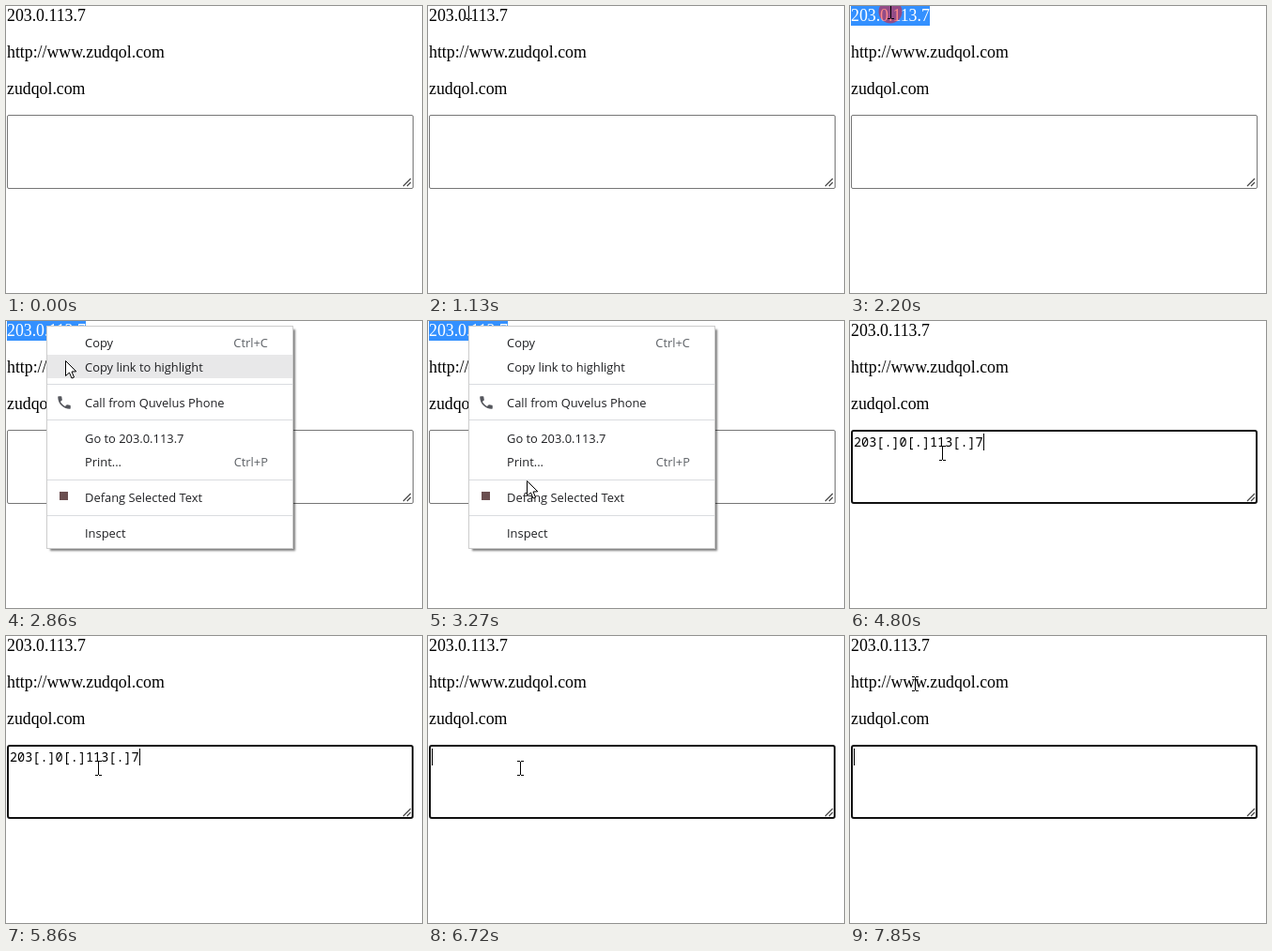
An HTML page with a canvas for the animation above (8000 ms loop, 443 px wide and 306 px high).

```html
<!DOCTYPE html>
<html lang="en">
<head>
<meta charset="utf-8">
<title>Defang from the context menu</title>
<style>
html, body { margin: 0; width: 100%; height: 100%; overflow: hidden; background: #fff; }
#stage { position: relative; width: 443px; height: 306px; overflow: hidden; background: #fff; }
#stage * { position: absolute; box-sizing: border-box; white-space: pre; }
.line { left: 1px; height: 21px; font: 17.8px/20px "Liberation Serif", "Times New Roman", serif; color: #000; }
.picked { background: #3390ff; color: #fff !important; }
#box { left: 1px; top: 116px; width: 433px; height: 79px; border: 1px solid #767676; border-radius: 2px; }
#box.focus { border: 2px solid #101010; border-radius: 3px; }
#grip { left: 422px; top: 183px; }
#typed { left: 4px; top: 120px; height: 18px; font: 13.5px/18px "Noto Sans Mono", "Liberation Mono", monospace; color: #000; }
#caret { top: 120px; width: 1px; height: 18px; background: #000; }
#menu { left: 43px; top: 5px; width: 263px; height: 238px; background: #fff; border: 1px solid #ccc;
  box-shadow: 3px 3px 2px -1px rgba(0, 0, 0, .5); font: 12.9px/27px "Open Sans", "Noto Sans", sans-serif; color: #202124; }
.row { left: 0; width: 261px; height: 25px; }
.row.hover { background: #e8e8e9; }
.row span { left: 40px; }
.row .key { left: auto; right: 26px; color: #5f6368; }
.rule { left: 0; width: 261px; height: 1px; background: #dadce0; }
#phone { left: 9px; top: 72px; }
#badge { left: 13px; top: 176px; width: 9px; height: 9px; background: #6b4f50; }
#top { left: 0; top: 0; }
</style>
</head>
<body>
<div id="stage">
  <div class="line" id="ip" style="top:0">203.0.113.7</div>
  <div class="line" style="top:39px">http://www.zudqol.com</div>
  <div class="line" style="top:78px">zudqol.com</div>
  <div id="box"></div>
  <svg id="grip" width="10" height="10" stroke="#444" stroke-width="1.2"><path d="M1 9L9 1M5 9L9 5"/></svg>
  <div id="typed"></div>
  <div id="caret"></div>
  <div id="menu"></div>
  <canvas id="top" width="443" height="306"></canvas>
</div>
<script>
const LOOP = 8000, STEP = 1000 / 15;
const $ = id => document.getElementById(id);
const ctx = $('top').getContext('2d');

// [top, label, shortcut]
const items = [
  [10, 'Copy', 'Ctrl+C'],
  [36, 'Copy link to highlight'],
  [74, 'Call from Quvelus Phone'],
  [112, 'Go to 203.0.113.7'],
  [137, 'Print...', 'Ctrl+P'],
  [175, 'Defang Selected Text'],
  [213, 'Inspect']
];

function add(cls, top) {
  const el = document.createElement('div');
  el.className = cls;
  el.style.top = top - 6 + 'px';
  $('menu').append(el);
  return el;
}

const rows = items.map(([top, label, key]) => {
  const el = add('row', top);
  el.innerHTML = `<span>${label}</span>` + (key ? `<span class="key">${key}</span>` : '');
  return { el, top };
});
[67, 105, 169, 207].forEach(y => add('rule', y));
$('menu').insertAdjacentHTML('beforeend',
  `<svg id="phone" width="18" height="18" viewBox="0 0 24 24" fill="#54565c"><path d="M6.6 10.8c1.4 2.8 3.8 5.1 6.6 6.6l2.2-2.2c.3-.3.7-.4 1-.2 1.1.4 2.3.6 3.6.6.6 0 1 .4 1 1V20c0 .6-.4 1-1 1C10.6 21 3 13.4 3 4c0-.6.4-1 1-1h3.5c.6 0 1 .4 1 1 0 1.2.2 2.4.6 3.6.1.3 0 .7-.2 1z"/></svg><div id="badge"></div>`);

const ease = {
  line: p => p,
  in: p => p * p,
  out: p => p * (2 - p),
  both: p => p * p * (3 - 2 * p)
};

// [time, x, y, easing towards this point]
const path = [
  [600, 250, 274],
  [1130, 43, 6, 'both'],
  [2600, 43, 6, 'line'],
  [2860, 63, 42, 'in'],
  [3270, 105, 170, 'line'],
  [3400, 109, 184, 'out'],
  [3670, 109, 184, 'line'],
  [3870, 98, 141, 'both'],
  [7250, 98, 141, 'line'],
  [7850, 69, 51, 'both']
];

const LEFT = 'rgba(255,255,0,.47)', RIGHT = 'rgba(255,0,0,.47)';
const clicks = [
  [1730, 1860, LEFT],
  [1930, 2060, LEFT],
  [2200, 2330, RIGHT],
  [3530, 3670, LEFT],
  [3930, 4000, LEFT]
];

const within = (t, a, b) => t >= a && t < b;

function pointer(t) {
  const i = path.findIndex(k => k[0] > t);
  if (i === 0) return null;
  if (i < 0) return path[path.length - 1].slice(1, 3);
  const [t0, x0, y0] = path[i - 1], [t1, x1, y1, e] = path[i];
  const seen = Math.floor((t - t0 + 14) / STEP) * STEP;
  const p = ease[e](Math.min(1, seen / (t1 - t0)));
  return [Math.round(x0 + (x1 - x0) * p), Math.round(y0 + (y1 - y0) * p)];
}

function overText(x, y) {
  const inside = (l, t, r, b) => x >= l && x < r && y >= t && y < b;
  return inside(1, 116, 434, 195) || inside(1, 0, 86, 21) ||
    inside(1, 39, 169, 60) || inside(1, 78, 85, 99);
}

function drawArrow(x, y) {
  ctx.save();
  ctx.translate(x + .5, y + .5);
  ctx.beginPath();
  [[0, 0], [0, 16], [4, 12.5], [6.5, 18.5], [9, 17.5], [6.5, 11.5], [11.3, 11.3]]
    .forEach(p => ctx.lineTo(...p));
  ctx.closePath();
  ctx.fillStyle = '#fff';
  ctx.fill();
  ctx.strokeStyle = '#000';
  ctx.lineWidth = 1;
  ctx.stroke();
  ctx.restore();
}

function drawBeam(x, y) {
  ctx.fillStyle = '#000';
  ctx.fillRect(x, y - 7, 1, 14);
  for (const end of [y - 8, y + 7]) {
    ctx.fillRect(x - 3, end, 3, 1);
    ctx.fillRect(x + 1, end, 3, 1);
  }
}

function caretX(t) {
  if (within(t, 3930, 4470) || within(t, 6720, 7250) || t >= 7780) return 4;
  if (within(t, 4800, 5330) || within(t, 5860, 5920)) return 142;
  return -1;
}

function render(t) {
  const menuOpen = within(t, 2330, 3670);
  const mouse = pointer(t);

  $('ip').classList.toggle('picked', within(t, 1930, 3930));
  $('box').classList.toggle('focus', t >= 3930);
  $('typed').textContent = within(t, 4800, 6720) ? '203[.]0[.]113[.]7' : '';
  $('typed').classList.toggle('picked', within(t, 5920, 6720));

  const cx = caretX(t);
  $('caret').style.display = cx < 0 ? 'none' : 'block';
  $('caret').style.left = cx + 'px';

  $('menu').style.display = menuOpen ? 'block' : 'none';
  rows.forEach(({ el, top }) =>
    el.classList.toggle('hover', menuOpen && within(mouse[1], top, top + 25)));

  ctx.clearRect(0, 0, 443, 306);
  if (!mouse) return;
  const click = clicks.find(([a, b]) => within(t, a, b));
  if (click) {
    ctx.fillStyle = click[2];
    ctx.beginPath();
    ctx.arc(...mouse, 12.5, 0, 7);
    ctx.fill();
  }
  (!menuOpen && overText(...mouse) ? drawBeam : drawArrow)(...mouse);
}

const start = performance.now();
function tick() {
  render((performance.now() - start) % LOOP);
  requestAnimationFrame(tick);
}
tick();
</script>
</body>
</html>
```
